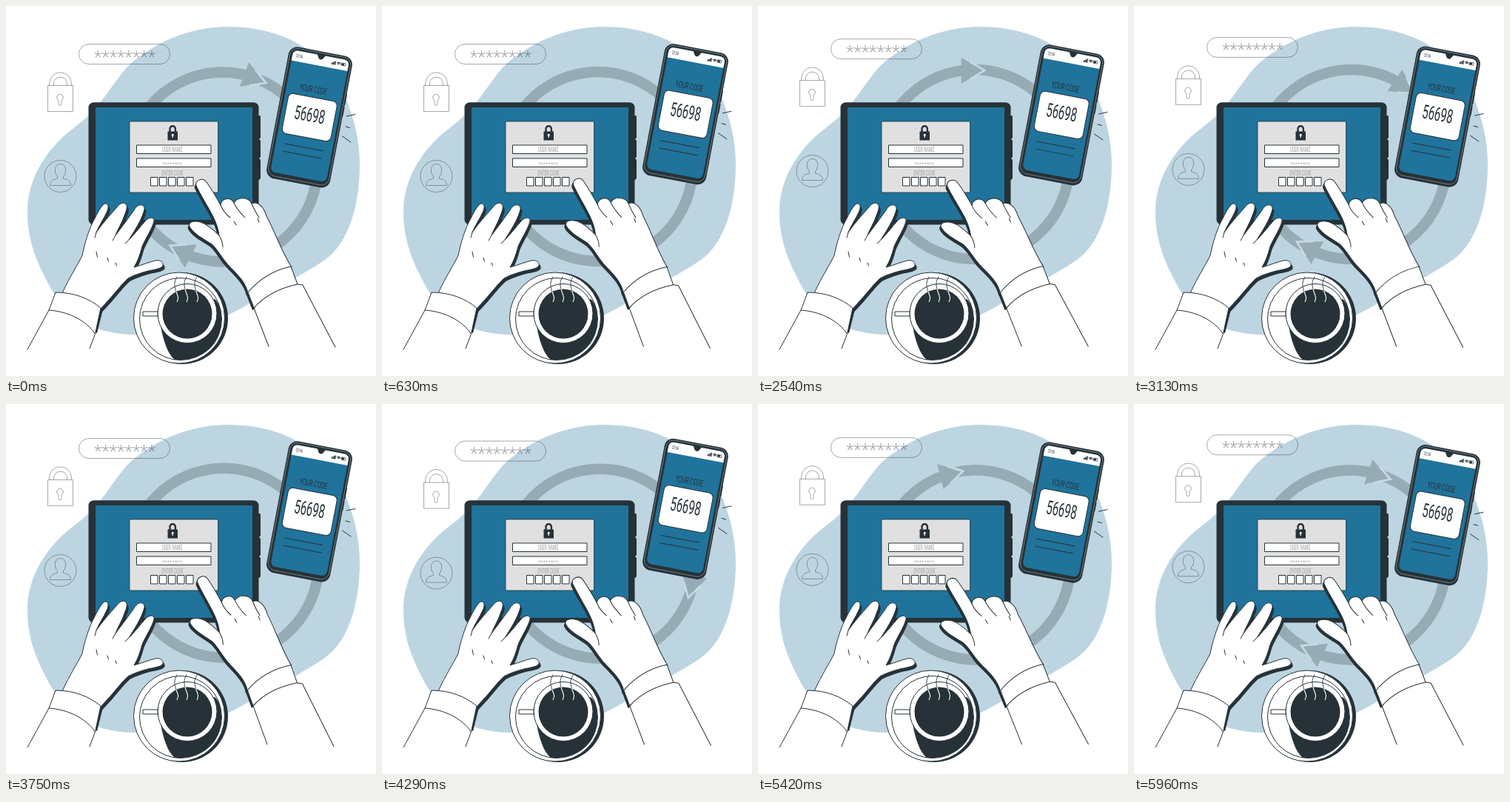
An HTML page for the animation above (6 s loop, 500 px wide and 500 px high).

```html
<!DOCTYPE html>
<html lang="en">
<head>
<meta charset="utf-8">
<title>Two step login</title>
<style>
  html, body { margin: 0; width: 100%; height: 100%; overflow: hidden; background: #fff; }
  svg { display: block; width: 100%; height: 100%; }
  text { font-family: Roboto, "Liberation Sans", sans-serif; text-anchor: middle; }
  .narrow { scale: .57 1; transform-box: fill-box; transform-origin: center; }
  .dark { fill: #263238; }
  .blue { fill: #20739b; }
  .line { fill: none; stroke: #263238; stroke-linecap: round; stroke-linejoin: round; }
  .white { fill: #fff; stroke: #263238; stroke-linejoin: round; }
  .faint { fill: none; stroke: #263238; stroke-opacity: .42; }
  .hint { fill: #9a9a9a; font-size: 8.8px; }
</style>
</head>
<body>
<svg viewBox="0 0 500 500">
  <defs>
    <g id="head">
      <path d="M-17 -144.500L14 -127L-17 -109.500Z" fill="#97abb5"/>
      <path d="M-5 -138.500L14.500 -127L-5 -115.500" fill="none" stroke="#c6dae4" stroke-width="2.800"/>
    </g>
    <path id="leftHand" d="M76 388C86 366 97 350 103 337C106 322 112 301 120 287C125 277 130 268 134 267
      C139 267 139 273 136 279C132 288 126 296 122 306C130 294 140 283 149 273C153 267 158 265 161 267
      C165 270 163 276 160 283C157 293 151 301 148 310C157 298 166 286 173 276C178 266 188 267 187 275
      C183 290 174 303 166 316C174 308 181 299 187 292C192 285 201 284 200 291C197 302 189 313 184 325
      C181 336 178 345 173 353C184 350 193 346 202 344C209 343 213 346 212 351C210 355 201 356 192 358
      C181 361 172 364 165 368C156 376 148 387 140 396L127 410Z"/>
    <path id="rightHand" d="M327 388C324 374 314 364 303 353C292 342 287 330 278 322C268 315 253 308 248 298
      C246 291 255 290 263 292C272 295 280 302 288 310C287 302 285 295 280 285C273 271 263 256 257 243
      C255 235 266 231 271 238C278 248 284 258 290 269C291 260 303 257 308 266C313 257 328 258 332 267
      C341 263 349 273 352 284C364 306 372 331 386 353Z"/>
    <clipPath id="coffee"><circle cx="245" cy="416" r="33.500"/></clipPath>
    <path id="steam" d="M231 366C226 374 228 380 230 386S234 394 231 400M244 366C239 374 241 380 243 386S247 394 244 400
      M258 366C253 374 255 380 257 386S261 394 258 400"/>
  </defs>

  <path fill="#bdd5e1" d="M300 28C375 28 430 62 455 115C470 148 478 180 478 215C478 258 468 312 436 339
    C412 358 370 378 335 398C290 428 230 446 170 444C114 442 77 419 52 365C36 335 28 305 29 275
    C30 235 52 195 90 166C126 140 139 112 163 83C200 48 250 28 300 28Z"/>

  <g id="ring">
    <g transform="translate(-.3 1.75)">
      <circle r="128" fill="none" stroke="#97abb5" stroke-width="14.500"/>
      <use href="#head" transform="rotate(20.700)"/>
      <use href="#head" transform="rotate(207.200)"/>
    </g>
  </g>

  <g id="icons">
    <rect class="faint" x="98.500" y="51.500" width="123" height="27" rx="13.500"/>
    <text x="160.500" y="76.500" font-size="24.500" font-weight="300" fill="#263238" fill-opacity=".42">********</text>
    <g class="faint">
      <path d="M56.500 107.500H90.500V142.500H56.500ZM58.500 107.500V105A14.800 15 0 0 1 88.500 105V107.500M64.500 107.500V105A9 9 0 0 1 82.500 105V107.500"/>
      <path d="M71 127.500A4.300 4.300 0 1 1 75 127.500V132.500A2 2 0 0 1 71 132.500Z"/>
      <circle cx="73.500" cy="230" r="21.500"/>
      <path d="M59.500 242.500C59.500 236 64 234.500 69.500 233V230.500C65 226 64.500 213.500 73.500 213.500S82 226 77.500 230.500V233C83 234.500 87.500 236 87.500 242.500Z"/>
    </g>
  </g>

  <g id="tablet">
    <path class="dark" d="M338 148H343Q344 148 344 150V178L342 180L344 182V204L342 206L344 208V232Q344 235 338 236Z"/>
    <rect class="dark" x="111.500" y="130.300" width="230" height="165.200" rx="7"/>
    <rect class="blue" x="121" y="137" width="212" height="152"/>
    <rect x="167" y="156" width="119.500" height="96" fill="#e0e0e0" stroke="#263238" stroke-width=".8"/>
    <path class="line" stroke-width="2.400" d="M221.500 171V166A3.700 3.700 0 0 1 228.900 166V171"/>
    <rect class="dark" x="218.500" y="169.500" width="13.500" height="12"/>
    <path d="M225.200 174.500V178" stroke="#fff" stroke-width="1.200"/>
    <circle cx="225.200" cy="174.300" r="1.500" fill="#fff"/>
    <path class="white" d="M176.500 188H277V199.500H176.500ZM176.500 206H277V217.500H176.500Z"/>
    <text class="narrow hint" x="224.500" y="196.900">USER NAME</text>
    <text x="224.500" y="216" font-size="8" font-weight="300" fill="#9a9a9a">********</text>
    <text class="narrow hint" x="225" y="229.500">ENTER CODE</text>
    <path class="white" d="M195.500 231.500h9.500v11.500h-9.500zm12 0h9.500v11.500h-9.500zm12 0h9.500v11.500h-9.500zm12 0h9.500v11.500h-9.500zm12 0h9.500v11.500h-9.500z"/>
  </g>

  <g id="cup">
    <circle class="dark" cx="238" cy="422" r="62"/>
    <circle class="white" cx="234" cy="421.500" r="61.500"/>
    <circle class="white" cx="236" cy="423" r="55.500"/>
    <path class="dark" d="M209 432C212 450 218 470 228 478C262 481 291 460 291 425C291 412 289 402 282 396Z"/>
    <circle class="white" cx="245" cy="415.500" r="40"/>
    <circle class="dark" cx="245" cy="416" r="33.500"/>
    <path class="white" d="M185 413H205V419H185Z"/>
    <use href="#steam" class="line" stroke-width=".9"/>
    <g clip-path="url(#coffee)"><use href="#steam" fill="none" stroke="#fff" stroke-width="1.100"/></g>
  </g>

  <g id="leftArm">
    <use href="#leftHand" class="dark" x="2.500" y="4"/>
    <path class="dark" d="M126 406L131 410L123 442L118 440Z"/>
    <use href="#leftHand" class="white"/>
    <path class="line" d="M122 332L123.500 339M137 340L138.500 345M148 347L149.500 351M122 306L120 313M148 310L144 317M166 316L161 321"/>
    <path fill="#fff" d="M58 411L29 464H113L121 443Z"/>
    <path class="white" d="M67 387C92 387 112 395 128 408L120.500 443C107 424 84 413 58 411Z"/>
    <path class="line" d="M58 411L29 464M120.500 443L113 463"/>
  </g>

  <g id="rightArm">
    <use href="#rightHand" class="dark" x="-2" y="3.500"/>
    <path class="dark" d="M329 384L324 388L333 411L338 408Z"/>
    <use href="#rightHand" class="white"/>
    <path class="line" d="M290 269C293 277 298 282 303 286M308 266C312 275 318 281 323 286M332 267C335 275 339 281 342 286M288 310C291 315 293 320 293 326M308 291L311 296M340 287L342 292"/>
    <path fill="#fff" d="M335 408L355 460H445L400 377Z"/>
    <path class="white" d="M327 387C342 369 362 357 385 352L394 376C371 381 350 391 335 408Z"/>
    <path class="line" d="M335 408L355 460M394 376L401 377L445 461"/>
  </g>

  <g id="phone">
    <path class="line" d="M460.500 149L472 146.500M459 163L464.500 164.500M454.500 176L466 184"/>
    <g transform="translate(410.500 149) rotate(10.800)">
      <path class="line" stroke-width="3" d="M42.500 -38V-25M42.500 -20V-9"/>
      <rect class="dark" x="-44" y="-89" width="87.500" height="181" rx="12"/>
      <rect x="-42" y="-87" width="83.500" height="175.500" rx="10.500" fill="none" stroke="#8b969b" stroke-width=".7"/>
      <rect class="blue" x="-38.500" y="-84" width="77" height="167.500" rx="7"/>
      <path fill="#fff" d="M-38.500 -69.500V-77Q-38.500 -84 -31 -84H31Q38.500 -84 38.500 -77V-69.500Z"/>
      <path class="dark" d="M-7 -85C-4 -84 -4 -78 0 -78S4 -84 7 -85Z"/>
      <text class="narrow dark" x="-29" y="-75" font-size="6.500">23:56</text>
      <path class="line" stroke-width="1.200" stroke-linecap="butt" d="M16 -75v-1.500m1.500 1.500v-2.500m1.500 2.500v-3.500m1.500 3.500v-4.500M23 -78q2 -1.500 4 0M24 -76.500q1 -1 2 0"/>
      <rect x="28.500" y="-79" width="6" height="3.500" rx=".8" fill="none" stroke="#263238" stroke-width=".7"/>
      <path class="dark" d="M29 -78.500h3.500v2.500h-3.500z"/>
      <text class="narrow dark" x="-2" y="-32.500" font-size="12.300">YOUR CODE</text>
      <rect class="white" x="-33.500" y="-26" width="67" height="55" rx="6.500"/>
      <text class="narrow dark" x="-.5" y="7" font-size="26">56698</text>
      <path class="line" d="M-26 42.700H26M-26 53H26"/>
    </g>
  </g>
</svg>
<script>
  const part = id => document.getElementById(id);
  const ring = part('ring'), icons = part('icons'), phone = part('phone'), arm = part('rightArm');
  const LOOP = 6000, BEAT = 3000, DELAY = 1500;

  const lift = p => -10 * (1 - Math.abs(2 * p - 1));
  const sway = p => p < .25 ? 4 * p : p < .75 ? 2 - 4 * p : 4 * p - 4;
  const phase = t => t % BEAT / BEAT;

  function draw(now) {
    const t = now % LOOP;
    ring.setAttribute('transform', `translate(293 215.75) rotate(${t / LOOP * 360})`);
    phone.setAttribute('transform', `translate(0 ${lift(phase(t))})`);
    // the icons rest before they start to float
    icons.setAttribute('transform', `translate(0 ${t < DELAY ? 0 : lift(phase(t - DELAY))})`);
    arm.setAttribute('transform', `rotate(${sway(phase(t))} 346 347)`);
  }

  const start = performance.now();
  function tick() {
    draw(performance.now() - start);
    requestAnimationFrame(tick);
  }
  tick();
</script>
</body>
</html>
```
